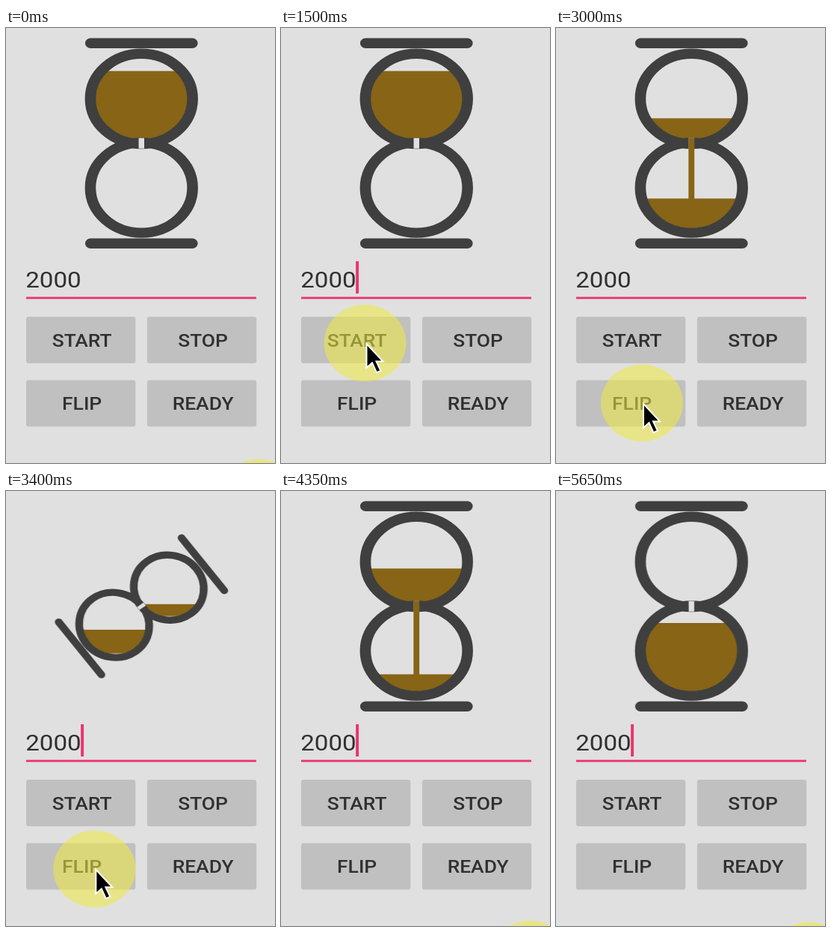
Recreate the animation shown at these times as an HTML page. Size 360x580 px, loop 5.85 s.

```html
<!DOCTYPE html>
<html lang="en">
<head>
<meta charset="utf-8">
<title>Hourglass</title>
<style>
  html, body { margin: 0; width: 100%; height: 100%; overflow: hidden; background: #e0e0e0; }
  svg { display: block; width: 360px; height: 580px; }
  #screen { filter: blur(.6px); }
  text { font-family: Roboto, sans-serif; fill: #303030; }
  .button rect { fill: #c0c0c0; }
  .button text { font-size: 24.2px; font-weight: 500; text-anchor: middle; }
  .sand { fill: #876416; }
  .frame { fill: none; stroke: #3f3f3f; stroke-width: 13.4; stroke-linecap: round; }
  .accent { fill: #e9356e; }
</style>
</head>
<body>
<svg viewBox="0 0 360 580">
  <defs>
    <clipPath id="clipA"><ellipse cy="-59.3" rx="57" ry="54"/></clipPath>
    <clipPath id="clipB"><ellipse cy="59.3" rx="57" ry="54"/></clipPath>
  </defs>
  <rect width="360" height="580" fill="#e0e0e0"/>
  <!-- The phone screen is shown slightly widened. -->
  <g id="screen" transform="scale(1.092 1)">
    <rect id="sandA" class="sand" x="30" width="280" clip-path="url(#clipA)"/>
    <rect id="sandB" class="sand" x="30" width="280" clip-path="url(#clipB)"/>
    <g id="glass">
      <g class="frame">
        <ellipse cy="-59.3" rx="62.6" ry="60.1"/>
        <ellipse cy="59.3" rx="62.6" ry="60.1"/>
        <path d="M-62.3-133.5H62.3M-62.3 133.5H62.3"/>
      </g>
      <rect x="-3.4" y="-7" width="6.8" height="14" fill="#e0e0e0"/>
    </g>
    <rect id="stream" class="sand" x="162.4" width="7.2"/>
    <text x="24" y="346.4" font-size="30.3">2000</text>
    <rect class="accent" x="24.7" y="358.5" width="282" height="2.8"/>
    <rect id="caret" class="accent" x="91.7" y="311" width="3.6" height="43"/>
  </g>
  <g id="pointer">
    <ellipse rx="55" ry="51.2" fill="#efea40" fill-opacity=".55"/>
    <path d="M2 1V33L9.5 26.5L15.5 39.5L21 37L15 24.5H24Z" fill="#000" stroke="#fff" stroke-width="2"/>
  </g>
</svg>
<script>
const LOOP = 5850, STEP = 50, LAST = 5650;
const CENTER = { x: 166, y: 153.7 }, BULB_OFFSET = 59.3, BULB_RADIUS = 54, NECK = 147;

// Sand drains at a constant rate, pausing while the glass turns over.
const POUR = 1895, FLIP_START = 3095, FLIP_END = 4125, REFALL = 4180, REPOUR = 4450;
const FULL = 91, RATE = 0.057, LAG = 410, FALL_SPEED = 0.8, TAIL_SPEED = 0.18;
const EMPTY = REPOUR + FLIP_START - POUR - LAG;

const CORNER = { x: 338, y: 626 };
const MOVES = [
  { from: 450, to: 1000, x: 118, y: 421 },
  { from: 1100, to: 1500, x: 112.5, y: 420 },
  { from: 1750, to: 2050, x: 106, y: 490 },
  { from: 2100, to: 2700, x: 115, y: 500 },
  { from: 3300, to: 3800, x: 147, y: 537 },
  { from: 3850, to: 4400, ...CORNER }
];

const $ = id => document.getElementById(id);
const clamp = (v, low, high) => Math.min(high, Math.max(low, v));
const progress = (t, from, to) => clamp((t - from) / (to - from), 0, 1);
const smooth = k => k * k * (3 - 2 * k);
const set = (node, attrs) => {
  for (const key in attrs) node.setAttribute(key, attrs[key]);
};

function addButton(label, index) {
  const x = 24.7 + index % 2 * 148.3, y = 385 + Math.floor(index / 2) * 84.4;
  $('screen').insertAdjacentHTML('beforeend',
    `<g class="button" transform="translate(${x} ${y})">
      <rect width="134" height="62" rx="3"/>
      <text x="68.4" y="39.8">${label}</text>
    </g>`);
}

function drawSand(name, side, depth, angle, scale) {
  const y = CENTER.y + side * BULB_OFFSET * Math.cos(angle) * scale;
  const top = y + (BULB_RADIUS - depth) * scale;
  set($('sand' + name), { y: top, height: depth * scale });
  return top;
}

function drawGlass(t) {
  const turn = progress(t, FLIP_START, FLIP_END);
  const angle = Math.PI * turn;
  const scale = 1 - 0.37 * Math.sin(angle);
  const transform = `translate(${CENTER.x} ${CENTER.y}) rotate(${turn * 180}) scale(${scale})`;
  set($('glass'), { transform });
  for (const id of ['clipA', 'clipB']) set($(id).firstChild, { transform });

  const first = clamp(t - POUR, 0, FLIP_START - POUR);
  const second = Math.max(0, t - REPOUR);
  const depthA = Math.min(FULL, FULL - RATE * (first - second));
  const depthB = Math.max(0, RATE * (Math.max(0, first - LAG) - second));
  const topA = drawSand('A', -1, depthA, angle, scale);
  const topB = drawSand('B', 1, depthB, angle, scale);

  const fallStart = t < REFALL ? POUR : REFALL;
  const head = Math.min(NECK + FALL_SPEED * (t - fallStart), Math.max(topA, topB) + 1);
  const tail = NECK + TAIL_SPEED * Math.max(0, t - EMPTY);
  const turning = t > FLIP_START && t < REFALL;
  set($('stream'), { y: tail, height: turning ? 0 : Math.max(0, head - tail) });
}

function drawPointer(t) {
  let { x, y } = CORNER;
  for (const move of MOVES) {
    const k = smooth(progress(t, move.from, move.to));
    x += (move.x - x) * k;
    y += (move.y - y) * k;
  }
  set($('pointer'), { transform: `translate(${x} ${y})` });
}

function draw(t) {
  drawGlass(t);
  drawPointer(t);
  set($('caret'), { visibility: (t + 770) % 1010 < 540 ? 'visible' : 'hidden' });
}

['START', 'STOP', 'FLIP', 'READY'].forEach(addButton);

const start = performance.now();
function tick() {
  const t = (performance.now() - start) % LOOP;
  draw(Math.min(LAST, Math.floor(t / STEP) * STEP));
  requestAnimationFrame(tick);
}
tick();
</script>
</body>
</html>
```
